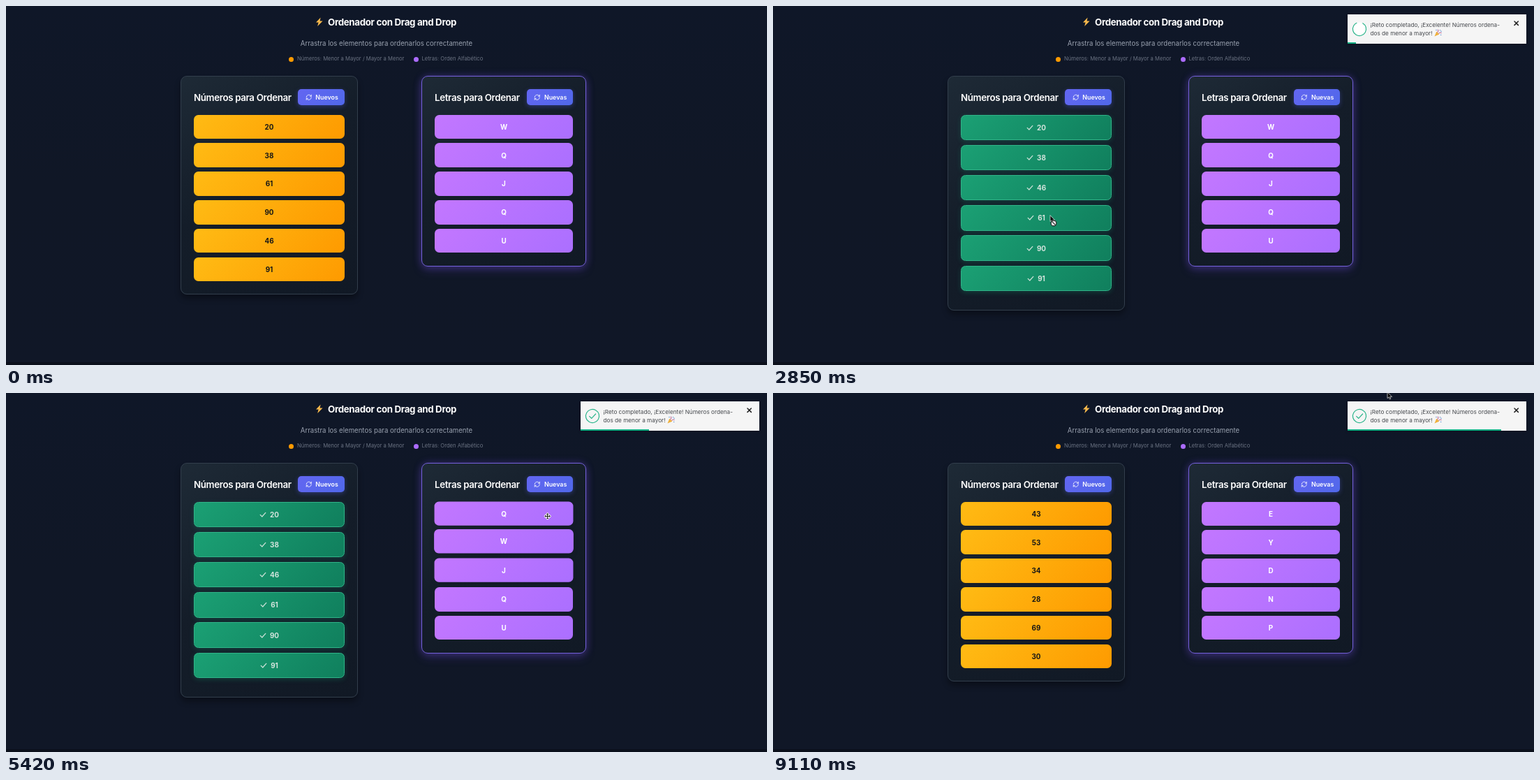
An HTML page for the animation above (9.21 s loop, 1090 by 514 pixels).

```html
<!DOCTYPE html>
<html lang="es">
<head>
<meta charset="utf-8">
<title>Ordenador con Drag and Drop</title>
<style>
  html, body { margin: 0; width: 100%; height: 100%; overflow: hidden; background: #101726; }
  #stage { position: relative; width: 1090px; height: 514px; overflow: hidden;
    background: linear-gradient(#0f1728, #101726 50%, #101727); font-family: Inter, sans-serif; }
  #stage div, #stage svg { position: absolute; box-sizing: border-box; }
  svg { overflow: visible; fill: none; stroke-linecap: round; stroke-linejoin: round; }
  .text { height: 20px; line-height: 20px; white-space: nowrap; color: #fff; }
  .mid { transform: translateX(-50%); }
  .head { font-size: 13.3px; font-weight: 600; letter-spacing: -.025em; }
  .sub { font-size: 9.65px; color: #99a1af; }
  .note { font-size: 7.65px; color: #6a7282; }
  .dot { width: 7px; height: 7px; border-radius: 50%; top: 72.5px; }
  .card { top: 99.5px; border-radius: 9px; background: linear-gradient(145deg, #1e2a36, #141d29 45%, #111925); }
  #numCard { left: 249.5px; width: 254.5px; border: 1.2px solid #323e4c; box-shadow: 0 6px 9px #0005; }
  #letCard { left: 594.5px; width: 236.5px; height: 273.5px; border: 1.5px solid #7561dc;
    box-shadow: 0 0 11px #6748c866, 0 6px 13px #5b3fb04d; }
  .btn { top: 119px; height: 23.3px; width: 66.8px; border-radius: 5px; color: #fff;
    background: linear-gradient(135deg, #6366f1, #5068ea); box-shadow: 0 2px 6px #4f5bd566; }
  .btn .over { inset: 0; border-radius: 5px; background: linear-gradient(135deg, #4c5fd6, #3b489f); }
  .btn .text { left: 25.3px; top: 1.6px; font-size: 8.9px; font-weight: 600; }
  .btn svg { left: 10.5px; top: 7px; width: 9.5px; height: 9.5px; stroke: #fff; stroke-width: 2; }
  .item { display: flex; align-items: center; justify-content: center; gap: 5px; border-radius: 6.5px;
    font-size: 9.9px; font-weight: 700; }
  .num { left: 269px; width: 216px; color: #161616; background: linear-gradient(135deg, #ffbb14, #fe9a00); }
  .let { left: 614px; width: 198px; color: #fff; background: linear-gradient(135deg, #c377ff, #ab6fff); }
  .num.done { color: #d5e5de; background: linear-gradient(135deg, #1ba074, #107f5d);
    border: 1.2px solid #2fb488; box-shadow: 0 2px 7px #10966a4d; }
  #stage .item svg { position: static; display: none; width: 10px; height: 10px; stroke: #c8e0d6; stroke-width: 1.3; }
  #stage .done svg { display: block; }
  #toast { left: 823px; top: 11.5px; width: 256px; height: 42px; background: #f5f5f5; box-shadow: 0 1px 4px #0004; }
  #toast .text { left: 32.5px; font-size: 8.2px; color: #45484d; }
  #bar { left: 0; bottom: 0; height: 2px; background: #12b084; }
  #floor { left: 0; top: 510px; width: 1090px; height: 4px; background: #0b101c; }
</style>
</head>
<body>
<div id="stage">
  <svg width="12" height="14" style="left:443px;top:16px"><path d="M7.6 .4 1 7.6h3.6L3.2 13 10.6 5.4H6.6z" fill="#f8b94c"/></svg>
  <div class="text mid head" style="left:553px;top:13px;font-weight:700">Ordenador con Drag and Drop</div>
  <div class="text mid sub" style="left:545px;top:43.5px">Arrastra los elementos para ordenarlos correctamente</div>
  <div class="dot" style="left:405.3px;background:#fe9a00"></div>
  <div class="text note" style="left:417px;top:66px">Números: Menor a Mayor / Mayor a Menor</div>
  <div class="dot" style="left:584px;background:#ac6cff"></div>
  <div class="text note" style="left:595.5px;top:66px">Letras: Orden Alfabético</div>

  <div class="card" id="numCard"></div>
  <div class="card" id="letCard"></div>
  <div class="text head" style="left:269px;top:121px">Números para Ordenar</div>
  <div class="text head" style="left:614px;top:121px">Letras para Ordenar</div>
  <div class="btn" style="left:418px"><div class="over"></div>
    <svg viewBox="0 0 24 24"><path id="spin" d="M3 12a9 9 0 0 1 15.5-6.2L21 8M21 3v5h-5M21 12a9 9 0 0 1-15.5 6.2L3 16M3 21v-5h5"/></svg>
    <div class="text">Nuevos</div></div>
  <div class="btn" style="left:745.6px"><div class="over"></div>
    <svg viewBox="0 0 24 24"><use href="#spin"/></svg>
    <div class="text">Nuevas</div></div>
  <div id="floor"></div>

  <div id="toast">
    <svg width="22" height="22" style="left:6px;top:10px" stroke="#2cb58c" stroke-width="1.2">
      <circle id="ring" cx="11" cy="11" r="9.6" pathLength="1" stroke-dasharray="1 2" transform="rotate(-60 11 11)"/>
      <path id="tick" d="M6.6 11.4 9.7 14.3 15.6 8" pathLength="1"/>
    </svg>
    <div class="text" style="top:5.5px">¡Reto completado, ¡Excelente! Números ordena-</div>
    <div class="text" style="top:17px">dos de menor a mayor!</div>
    <svg width="11" height="11" style="left:124px;top:21.5px">
      <path d="M.5 10.5 3.4 3.6 7.4 7.6z" fill="#efb13d"/>
      <path d="M5 4.6Q6.6 3 5.6 1M6.6 6Q8.2 4.4 10.2 5.4" stroke="#b5548c"/>
      <path d="M3 1.5h.1M8.4 1.6h.1M10 3.2h.1M9.6 8.4h.1" stroke="#5a8fd0" stroke-width="1.4"/>
    </svg>
    <svg width="8" height="8" style="left:237.5px;top:9px"><path d="M1 1 6.4 6.4M6.4 1 1 6.4" stroke="#222" stroke-width="1.5"/></svg>
    <div id="bar"></div>
  </div>

  <svg id="cursor" width="1" height="1" style="left:0;top:0">
    <g id="arrow">
      <path d="M0 0V8.6L2 6.9 3.4 9.9 4.8 9.2 3.5 6.4H6.2z" fill="#0a0a0a" stroke="#e8e8e8" stroke-width=".7"/>
      <g id="ban"><circle cx="5" cy="11" r="3.9" fill="#e6e6e6" stroke="#222" stroke-width="1.1"/>
        <path d="M2.4 8.4 7.6 13.6" stroke="#222" stroke-width="1.1"/></g>
    </g>
    <g id="move">
      <path id="cross" d="M-3.2 0H3.2M0-3.2V3.2M-1-2.8 0-3.8 1-2.8M-1 2.8 0 3.8 1 2.8M-2.8-1-3.8 0-2.8 1M2.8-1 3.8 0 2.8 1" stroke="#fff" stroke-width="2.2"/>
      <use href="#cross" style="stroke:#111"/>
      <path d="M-3.2 0H3.2M0-3.2V3.2M-1-2.8 0-3.8 1-2.8M-1 2.8 0 3.8 1 2.8M-2.8-1-3.8 0-2.8 1M2.8-1 3.8 0 2.8 1" stroke="#111" stroke-width="1"/>
    </g>
  </svg>
</div>
<script>
const LOOP = 9210, DONE = [2440, 7060], TOAST = 2490;
const $ = id => document.getElementById(id);
const clamp = v => Math.max(0, Math.min(1, v));
const between = (t, a, b) => t >= a && t < b;

// Contents of each list from a given time on
const orders = [
  [[0, '20 38 61 90 46 91'], [2170, '20 38 61 46 90 91'], [2270, '20 38 46 61 90 91'],
   [7060, '94 68 46 5 70 64'], [8020, '43 53 34 28 69 30']],
  [[0, 'W Q J Q U'], [4300, 'Q W J Q U'], [5760, 'X M Q B D'], [6640, 'E Y D N P']]
];
// list, from, to, row
const drags = [[0, 1860, 2170, 4], [0, 2170, 2270, 3], [0, 2270, 2440, 2], [1, 4060, 4300, 1], [1, 4300, 4480, 0]];
// time, x, y
const path = [[160, 985, 18], [900, 440, 300], [1500, 378, 344], [1900, 374, 342], [1990, 374, 342],
  [2320, 384, 256], [2460, 386, 258], [2850, 397, 300], [3050, 410, 300], [3750, 700, 225], [4080, 712, 214],
  [4380, 716, 173], [4520, 717, 180], [4840, 721, 286], [5100, 728, 300], [5600, 792, 134], [6300, 794, 130],
  [6680, 793, 131], [7000, 458, 131], [7120, 456, 132], [7460, 399, 227], [7560, 397, 232],
  [7900, 455, 133], [8060, 456, 132], [8590, 880, -1], [LOOP, 880, -1]];

const columns = [['num', 6], ['let', 5]].map(([kind, count]) => Array.from({ length: count }, () => {
  const el = document.createElement('div');
  el.className = 'item ' + kind;
  el.innerHTML = '<svg viewBox="0 0 10 10"><path d="M1.2 5.4 3.8 8 8.8 2.4"/></svg><span></span>';
  $('stage').insertBefore(el, $('floor'));
  return el;
}));
const buttons = [...document.querySelectorAll('.btn')];

function pointer(t) {
  const i = path.findIndex(p => p[0] > t);
  if (i <= 0) return i ? path[path.length - 1].slice(1) : [-50, -50];
  const [t0, x0, y0] = path[i - 1], [t1, x1, y1] = path[i];
  const u = (t - t0) / (t1 - t0), e = u * u * (3 - 2 * u);
  return [x0 + (x1 - x0) * e, y0 + (y1 - y0) * e];
}

const isDone = t => between(t, ...DONE);
const dragAt = t => drags.find(d => between(t, d[1], d[2]));
const rowBox = (list, row, t) => !list && isDone(t)
  ? { top: 155.5 + row * 43.2, height: 36.6 }
  : { top: 155.5 + row * 40.9, height: 34.4 };

function overItem(list, row, t) {
  const [x, y] = pointer(t), box = rowBox(list, row, t);
  return between(x, ...(list ? [614, 812] : [269, 485])) && between(y, box.top, box.top + box.height);
}
function overButton(i, t) {
  const [x, y] = pointer(t), left = i ? 746 : 418;
  return between(x, left, left + 67) && between(y, 119, 142);
}
// Averaging the recent past gives the hover transition
function ease(test, t) {
  let sum = 0;
  for (let i = 0; i < 8; i++) sum += test(t - i * 22);
  return sum / 8;
}

function render(t) {
  const done = isDone(t), drag = dragAt(t);
  let onItem = !!drag, banned = false;
  columns.forEach((items, list) => {
    const labels = orders[list].filter(o => o[0] <= t).pop()[1].split(' ');
    items.forEach((el, row) => {
      const box = rowBox(list, row, t), fixed = !list && done;
      const held = drag && drag[0] === list && drag[3] === row;
      const over = overItem(list, row, t);
      onItem = onItem || over;
      banned = banned || (over && fixed);
      const h = fixed || drag ? 0 : ease(s => overItem(list, row, s) && !dragAt(s), t);
      el.lastChild.textContent = labels[row];
      el.classList.toggle('done', fixed);
      el.style.top = box.top + 'px';
      el.style.height = box.height + 'px';
      el.style.opacity = held ? .64 : 1;
      el.style.transform = `translateY(${-1.5 * h}px) scale(${1 + .018 * h})`;
      el.style.boxShadow = h ? `0 3px 7px rgba(0,0,0,${.25 * h})` : '';
    });
  });
  $('numCard').style.height = (done ? 336.5 : 313.5) + 'px';
  buttons.forEach((el, i) => {
    const h = ease(s => overButton(i, s), t);
    el.firstChild.style.opacity = h;
    el.style.transform = `translateY(${-h}px)`;
  });

  $('toast').style.opacity = clamp((t - TOAST + 60) / 160);
  $('bar').style.width = Math.max(0, (t - TOAST) / 30) + 'px';
  $('ring').style.strokeDashoffset = 1 - clamp((t - 2560) / 340);
  $('ring').style.fill = t < 2940 ? '#fff' : 'none';
  const tick = clamp((t - 2900) / 300);
  $('tick').style.strokeDasharray = tick + ' 2';
  $('tick').style.visibility = tick ? 'visible' : 'hidden';

  const [x, y] = pointer(t), moving = onItem && !banned;
  $('cursor').style.transform = `translate(${x}px,${y}px)`;
  $('move').style.display = moving ? '' : 'none';
  $('arrow').style.display = moving ? 'none' : '';
  $('ban').style.display = banned ? '' : 'none';
}

function frame() {
  const t = performance.now() % LOOP;
  render(t < 70 ? 0 : 70 + Math.max(0, Math.floor((t - 60) / 95.4)) * 95.8);
  requestAnimationFrame(frame);
}
frame();
</script>
</body>
</html>
```
